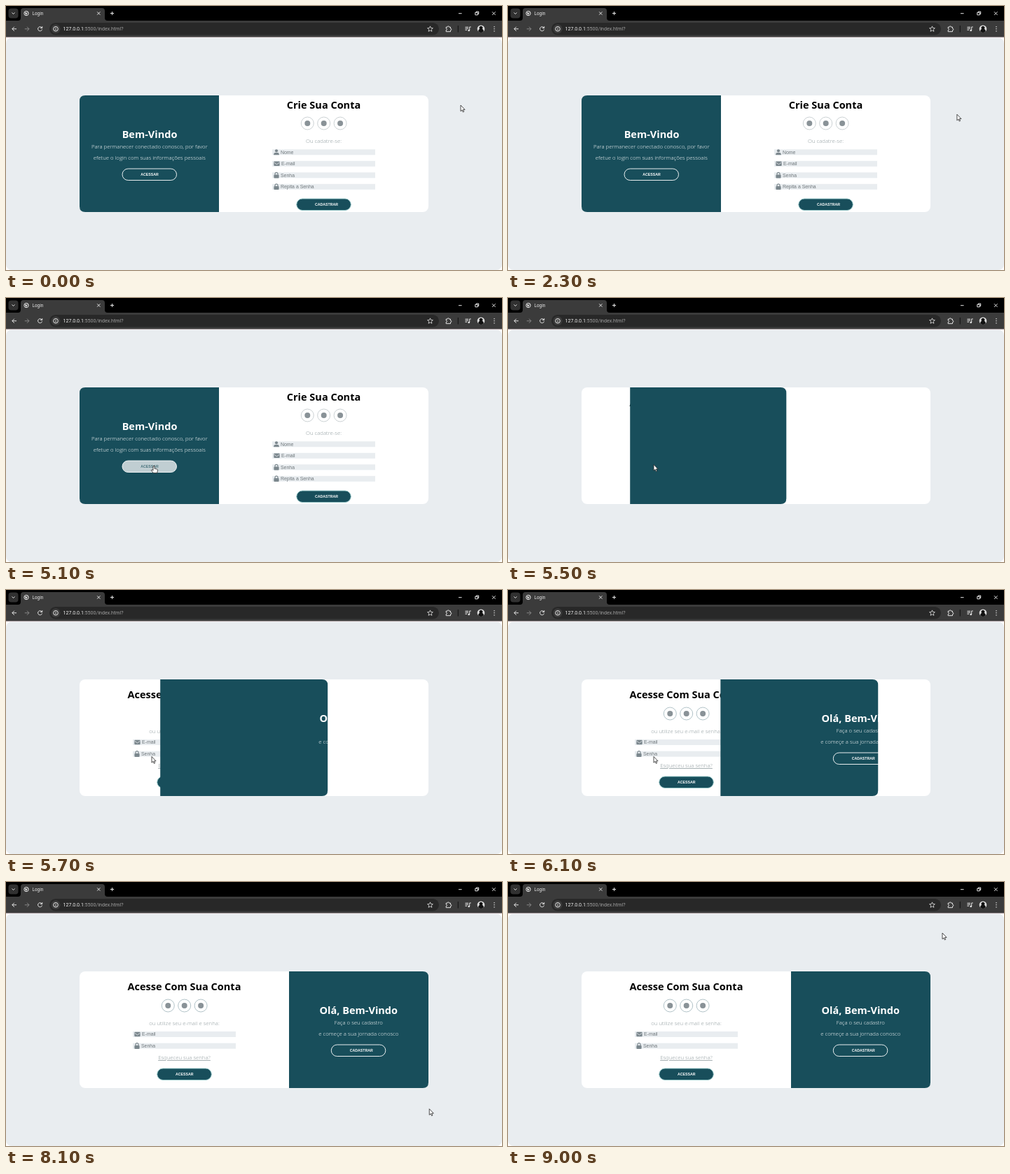
These frames come from a looping animation (708 by 378 pixels, 9300 ms). An HTML page:

```html
<!DOCTYPE html>
<html lang="pt-BR">
<head>
<meta charset="utf-8">
<title>Login</title>
<style>
html, body { margin: 0; width: 100%; height: 100%; overflow: hidden; background: #fff; }
svg { display: block; width: 708px; height: 378px; }
text { white-space: pre; }
.ui { font-family: Roboto, sans-serif; }
.title { font: 700 14.5px "Open Sans", sans-serif; text-anchor: middle; }
.copy { font: 300 7.77px "Open Sans", sans-serif; text-anchor: middle; }
.field { font: 6.91px "Liberation Sans", Arial, sans-serif; fill: #6f777b; }
.btn { font: 700 5.2px "Liberation Sans", Arial, sans-serif; text-anchor: middle; fill: #fff; }
.grey { fill: #8c989b; }
.light { fill: #fff; }
.line { fill: none; stroke: #e6e6e6; stroke-width: 1; }
</style>
</head>
<body>
<svg viewBox="0 0 708 378">
  <!-- browser window -->
  <rect width="708" height="45"/>
  <rect y="21" width="708" height="24" fill="#3b3b3b"/>
  <path d="M17 21q4 0 4-4V7q0-4 4-4H137q4 0 4 4V17q0 4 4 4Z" fill="#3b3b3b"/>
  <rect x="3.5" y="3.5" width="14" height="14" rx="4" fill="#313131"/>
  <rect x="62" y="24" width="556" height="17.5" rx="8.7" fill="#282828"/>
  <circle cx="71" cy="32.8" r="6.5" fill="#3b3b3b"/>
  <g class="line">
    <path d="M8.500 9.500l2 2 2-2M130.200 8.400l4.200 4.200m0-4.200l-4.200 4.200M149 10.500h5m-2.500-2.500v5"/>
    <path d="M646 10.700h4.600M669.800 9.300h3.500v3.500h-3.500zM671.200 9.300v-1.300h3.500v3.500h-1.400M694 8.300l4.600 4.600m0-4.600l-4.600 4.600"/>
    <path d="M15 32.800H8.800m3-3l-3 3 3 3"/>
    <path d="M26.800 32.800H33m-3-3l3 3-3 3" stroke="#858585"/>
    <path d="M51.200 31.300A3 3 0 1 0 51.500 33.500M51.700 29.200v2.400h-2.500"/>
    <circle cx="71" cy="32.800" r="3.300"/>
    <path d="M71 32.300v2.300M71 30.800v.8"/>
    <path d="M605.500 28.900l1.100 2.600 2.800.2-2.100 1.900.6 2.800-2.400-1.500-2.400 1.500.6-2.800-2.100-1.900 2.800-.2z" stroke-width=".8"/>
    <path d="M628.200 30.200h1.800a1.300 1.300 0 0 1 2.600 0h1.900v2a1.300 1.300 0 0 1 0 2.600v1.900h-6.300v-2a1.200 1.200 0 0 0 0-2.500z"/>
    <path d="M655.500 30.300h4.500m-4.500 2h4.500m-4.500 2h2.500M661.700 35V30h2"/>
    <path d="M645.300 28v9.500" stroke="#111"/>
    <circle cx="29" cy="10.500" r="3.200"/>
  </g>
  <circle cx="660.700" cy="35" r="1.300" fill="#e6e6e6"/>
  <path d="M26.500 9l3 .3 1 1.700-2 2zM30 8l2 1v2z" fill="#cfcfcf"/>
  <circle cx="678" cy="32.800" r="5.300" fill="#dedede"/>
  <path d="M674.200 36.400q0-3 2.300-3.300a2.400 2.400 0 1 1 3 0q2.300.3 2.300 3.300a5.300 5.300 0 0 1-7.600 0" fill="#111"/>
  <path d="M697 29.700v.01m0 3.090v.01m0 3.090v.01" stroke="#e6e6e6" stroke-width="1.500" stroke-linecap="round"/>
  <text class="ui" x="37.500" y="13" font-size="6.400" fill="#e8e8e8">Login</text>
  <text class="ui" x="81.500" y="35.300" font-size="7.070" fill="#a0a0a0"><tspan fill="#f2f2f2">127.0.0.1</tspan>:5500/index.html?</text>

  <!-- page -->
  <rect y="44.500" width="708" height="1" fill="#ead9dd"/>
  <rect y="45.500" width="708" height="332.500" rx="8" fill="#e9edf0"/>
  <rect x="105" y="128" width="498" height="167" rx="8" fill="#fff"/>
  <g id="signup"></g>
  <g id="login"></g>
  <path id="panel" fill="#184e5b"/>
  <g id="welcome"></g>
  <g id="hello"></g>
  <path id="arrow" d="M0 0V8.700L2 6.900 3.300 9.900 4.700 9.300 3.400 6.400H6.100Z" fill="#fff" stroke="#222" stroke-width=".8"/>
  <path id="hand" d="M-1 .8Q0-.4 1 .8V4.200L4.800 5.200Q5.600 5.500 5.500 6.500L4.700 10.600H-.6L-3.600 6.800Q-3.200 5.200-1.800 6.200L-1 7Z" fill="#fff" stroke="#222" stroke-width=".8"/>
</svg>
<script>
const LOOP = 9300, CLICK = 5200, HOVER = 4700;
const TEAL = [24, 78, 91], PALE = [233, 237, 240], WHITE = [255, 255, 255];
const $ = id => document.getElementById(id);

const text = (cls, x, y, s, more = '') => `<text class="${cls}" x="${x}" y="${y}" ${more}>${s}</text>`;
const button = (x, y, label, tx, fill, stroke) =>
  `<rect x="${x}" y="${y}" width="77.500" height="16.500" rx="8.250" fill="${fill}" stroke="${stroke}" stroke-width=".9"/>` +
  text('btn', tx, y + 10.2, label);
const socials = (cx, cy, stroke) => [-23.4, 0, 23.4].map(d =>
  `<circle cx="${cx + d}" cy="${cy}" r="9" fill="none" stroke="${stroke}" stroke-width=".9"/>
   <circle cx="${cx + d}" cy="${cy}" r="4" fill="#899297"/>`).join('');

const icons = {
  user: '<circle cy="-2" r="2.100"/><path d="M-3.800 4V3Q-3.800.700-1.500.700H1.500Q3.800.700 3.800 3V4Z"/>',
  mail: '<rect x="-4.200" y="-3.200" width="8.400" height="6.500" rx="1"/><path d="M-4-1.800L0 1 4-1.800" fill="none" stroke="#e9edf0" stroke-width=".8"/>',
  lock: '<rect x="-3.600" y="-.800" width="7.200" height="5" rx="1"/><path d="M-2-.500V-2a2 2 0 0 1 4 0V-.500" fill="none" stroke="#7b878d" stroke-width="1.200"/>'
};
const field = (x, y, icon, label) => {
  const wide = icon == 'mail' ? 1 : 0;
  return `<rect x="${x}" y="${y - 4}" width="147" height="8" fill="#e9edf0"/>
    <g transform="translate(${x + 6 + wide / 2} ${y})" fill="#7b878d">${icons[icon]}</g>` +
    text('field', x + 12 + wide, y + 2.3, label);
};

$('signup').innerHTML = text('title', 453.5, 146.5, 'Crie Sua Conta') +
  socials(453.7, 168, '#c6cccf') +
  text('copy grey', 453.5, 196.3, 'Ou cadatre-se:') +
  [['user', 'Nome'], ['mail', 'E-mail'], ['lock', 'Senha'], ['lock', 'Repita a Senha']]
    .map((f, i) => field(380, 209.3 + 16.5 * i, ...f)).join('') +
  button(414.8, 276, 'CADASTRAR', 457.5, '#184e5b', '#8fc3c4');

$('login').innerHTML = text('title', 254.5, 155.2, 'Acesse Com Sua Conta') +
  socials(254.7, 177, '#a9bbc1') +
  text('copy grey', 254.5, 205, 'ou utilize seu e-mail e senha:') +
  field(181, 218, 'mail', 'E-mail') + field(181, 234.7, 'lock', 'Senha') +
  text('copy grey', 254.5, 254, 'Esqueceu sua senha?', 'text-decoration="underline"') +
  button(215.8, 267, 'ACESSAR', 254.8, '#184e5b', '#8fc3c4');

$('welcome').innerHTML = text('title light', 205, 189, 'Bem-Vindo') +
  text('copy light', 204.8, 204, 'Para permanecer conectado conosco, por favor') +
  text('copy light', 204.8, 219.5, 'efetue o login com suas informações pessoais') +
  button(166, 233, 'ACESSAR', 205, 'none', '#fff');

$('hello').innerHTML = text('title light', 503.3, 189, 'Olá, Bem-Vindo') +
  text('copy light', 503.3, 204, 'Faça o seu cadastro') +
  text('copy light', 503.3, 219.5, 'e começe a sua jornada conosco') +
  button(464.3, 233, 'CADASTRAR', 507.3, 'none', '#fff');

const hoverBox = $('welcome').querySelector('rect');
const hoverText = $('welcome').querySelector('.btn');

// Rows of [time, a, b], joined by straight lines
const pointer = [
  [2200, 649, 142], [2400, 633, 168], [2550, 608, 174], [2700, 587, 156],
  [3800, 587, 156], [4050, 500, 200], [4300, 370, 246], [4500, 255, 258], [4700, 211, 240],
  [5150, 211, 240], [5300, 208, 238.500], [7200, 208, 238.500],
  [7450, 295, 290], [7750, 430, 328], [8100, 604, 325],
  [8250, 640, 295], [8600, 638, 170], [9000, 620, 73]
];
const edges = [[CLICK, 105, 304], [5700, 220, 459], [6100, 303, 528], [6400, 404, 603]];

function at(keys, t) {
  const i = keys.findIndex(k => k[0] > t);
  if (i == 0) return keys[0].slice(1);
  if (i < 0) return keys[keys.length - 1].slice(1);
  const a = keys[i - 1], b = keys[i], p = (t - a[0]) / (b[0] - a[0]);
  return [1, 2].map(n => a[n] + (b[n] - a[n]) * p);
}
const mix = (a, b, p) => `rgb(${a.map((v, i) => Math.round(v + (b[i] - v) * p))})`;
const show = (id, on) => $(id).setAttribute('display', on ? 'inline' : 'none');

function draw(now) {
  const t = now % LOOP, switched = t >= CLICK;
  show('signup', !switched);
  show('welcome', !switched);
  show('login', switched);
  show('hello', switched);

  const [l, r] = at(edges, t);
  $('panel').setAttribute('d', switched
    ? `M${l} 128H${r - 8}q8 0 8 8V287q0 8-8 8H${l}Z`
    : `M${r} 128H${l + 8}q-8 0-8 8V287q0 8 8 8H${r}Z`);

  const p = Math.min(1, Math.max(0, (t - HOVER) / 500));
  hoverBox.setAttribute('fill', mix(TEAL, PALE, p));
  hoverText.style.fill = mix(WHITE, TEAL, p);

  const [x, y] = at(pointer, t), hand = t >= HOVER - 50 && !switched;
  show('hand', hand);
  show('arrow', !hand);
  $(hand ? 'hand' : 'arrow').setAttribute('transform', `translate(${x} ${y})`);
  requestAnimationFrame(draw);
}
draw(0);
</script>
</body>
</html>
```
